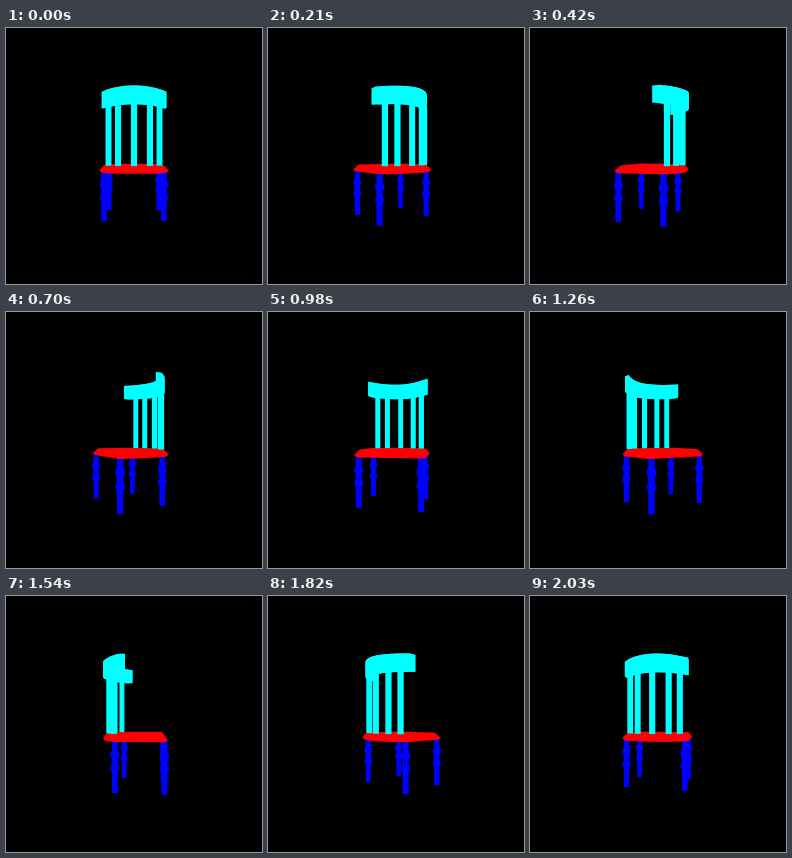
Animation of 256x256 px, one loop 2100 ms. Source, as an HTML page with a canvas:

```html
<!DOCTYPE html>
<html lang="en">
<head>
<meta charset="utf-8">
<title>Turning chair</title>
<style>
  html, body { margin: 0; width: 100%; height: 100%; overflow: hidden; background: #000; }
  canvas { display: block; width: 256px; height: 256px; }
</style>
</head>
<body>
<canvas id="stage" width="256" height="256"></canvas>
<script>
const ctx = document.getElementById('stage').getContext('2d');
const STEP = 70, STEPS = 30, CENTER = 128, CAMERA = 227;
const CYAN = '#00ffff', RED = '#ff0000', BLUE = '#0000ff';

let cos = 1, sin = 0;

// Model space: x right, y down, z towards the viewer.
function project(x, y, z) {
  const scale = CAMERA / (CAMERA - (z * cos - x * sin));
  return { x: CENTER + (x * cos + z * sin) * scale, y: CENTER + y * scale, scale };
}

function hull(points) {
  const sorted = [...points].sort((a, b) => a.x - b.x || a.y - b.y);
  const half = list => {
    const out = [];
    for (const p of list) {
      while (out.length > 1) {
        const a = out[out.length - 2], b = out[out.length - 1];
        if ((b.x - a.x) * (p.y - a.y) - (b.y - a.y) * (p.x - a.x) > 0) break;
        out.pop();
      }
      out.push(p);
    }
    return out.slice(0, -1);
  };
  return [...half(sorted), ...half(sorted.reverse())];
}

function addShape(points) {
  points.forEach((p, i) => i ? ctx.lineTo(p.x, p.y) : ctx.moveTo(p.x, p.y));
  ctx.closePath();
}

function paint(color, build) {
  ctx.fillStyle = color;
  ctx.beginPath();
  build();
  ctx.fill();
}

// A turned post: [height, radius] pairs revolved around a vertical axis.
function addPost(x, z, profile) {
  const side = dir => profile.map(([y, r]) => {
    const p = project(x, y, z);
    return { x: p.x + dir * r * p.scale, y: p.y };
  });
  addShape([...side(1), ...side(-1).reverse()]);
}

const legs = [[-28, 14], [28, 14], [-28, -29.4], [28, -29.4]];
const legProfile = [
  [13, 2.7], [23.5, 2.7], [25.5, 3.9], [29, 3.9], [31, 2.8],
  [35.5, 2.8], [37.5, 3.9], [40, 3.9], [42, 2.7], [61, 2.6]
];

const spindles = [[-23.7, 16], [-14.4, 22], [0, 25], [14.4, 22], [23.7, 16]];
const spindleProfile = [[-48, 2.75], [9, 2.75]];

const seatHalf = [[0, 30], [15, 28], [27, 22], [32.7, 13], [32.3, -30], [30.5, -32]];
const seatOutline = [...seatHalf, ...seatHalf.map(([x, z]) => [-x, z])];
const seatRings = [[8.7, 0.87], [13.6, 1], [15.6, 0.95]];

const CREST_TOP = -61, CREST_BOTTOM = -46.3, CREST_HALF = 30.8, CREST_PARTS = 16;

function crestColumn(i) {
  const u = i / CREST_PARTS * 2 - 1;
  const inner = 24 - 19.3 * u * u;
  return [inner, inner + 6.8].flatMap(z =>
    [CREST_TOP, CREST_BOTTOM].map(y => project(u * CREST_HALF, y, z)));
}

function draw(step) {
  const angle = step / STEPS * 2 * Math.PI;
  cos = Math.cos(angle);
  sin = Math.sin(angle);
  ctx.fillStyle = '#000';
  ctx.fillRect(0, 0, 256, 256);

  for (const [x, z] of legs) paint(BLUE, () => addPost(x, z, legProfile));

  paint(RED, () => addShape(hull(seatRings.flatMap(([y, k]) =>
    seatOutline.map(([x, z]) => project(x * k, y, z * k))))));

  for (const [x, z] of spindles) paint(CYAN, () => addPost(x, z, spindleProfile));

  // Neighbouring parts overlap by one column so no seams show.
  for (let i = 0; i < CREST_PARTS; i++) {
    const next = Math.min(i + 2, CREST_PARTS);
    paint(CYAN, () => addShape(hull([...crestColumn(i), ...crestColumn(next)])));
  }
}

const start = performance.now();
function tick() {
  draw(Math.floor((performance.now() - start) / STEP) % STEPS);
  requestAnimationFrame(tick);
}
tick();
</script>
</body>
</html>
```
